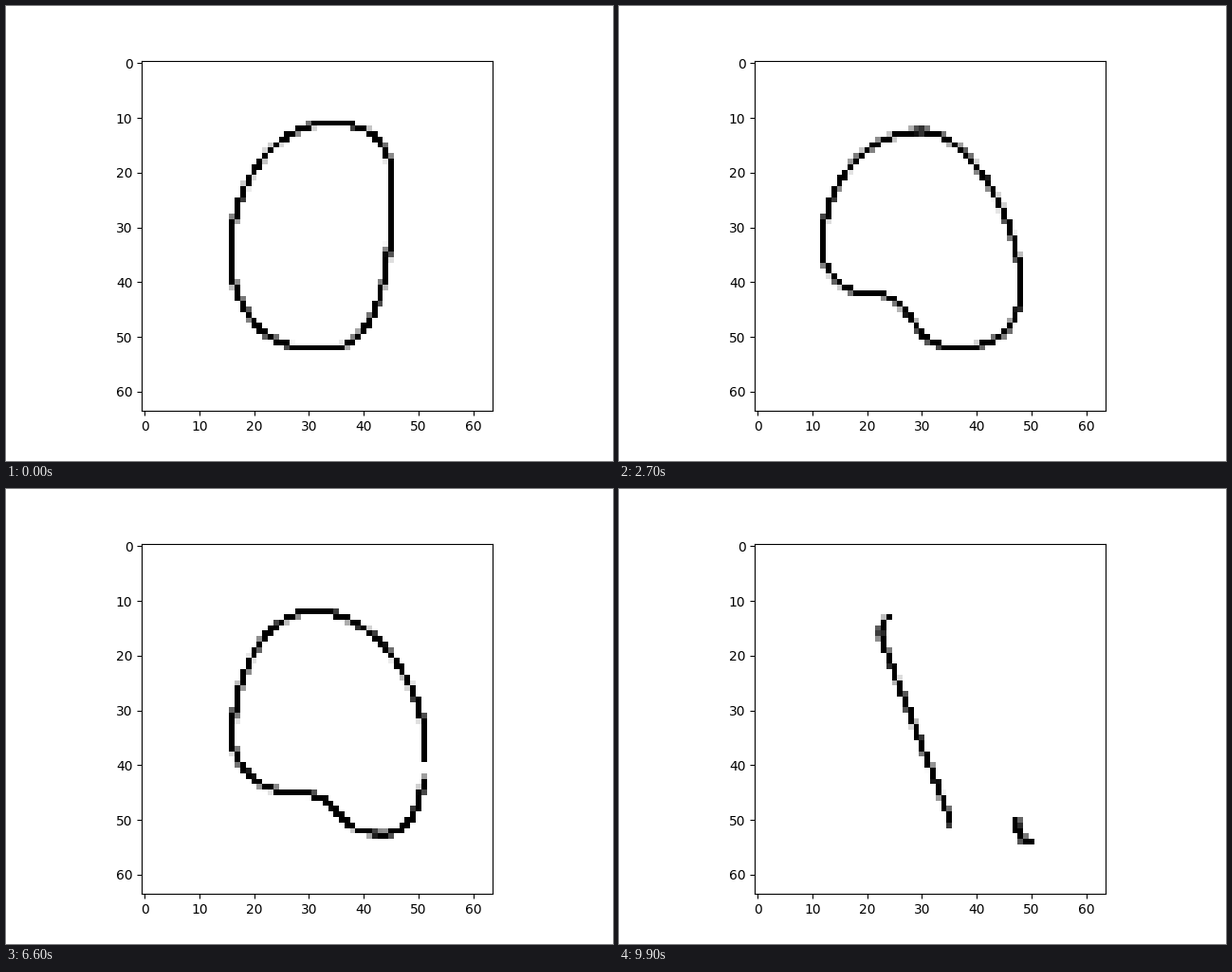
A matplotlib script for the animation above (10000 ms loop, 640 by 480 pixels).

```python
import numpy as np
import matplotlib.pyplot as plt
from matplotlib.animation import FuncAnimation

FRAMES, INTERVAL = 100, 100
SIZE = 64      # cells per side
SUB = 64       # samples per arc
HALF = 0.7     # half the line width, in cells
H, V = np.array([1, 0]), np.array([0, 1])


def pose(top, right, bottom, shelf, left):
    """The points where an outline runs level or upright."""
    return np.array([top, right, bottom, shelf, left], float)


POSES = {
    0: pose((34, 11), (45.2, 22), (34, 52), (29, 51.9), (15.8, 35)),
    11: pose((32, 11.6), (44, 38), (35, 52.2), (27, 49.8), (14, 34.5)),
    27: pose((30, 12.5), (48, 41), (36.5, 52), (20, 42), (11.9, 33.5)),
    53: pose((28.5, 11.9), (50.6, 40), (41, 52.1), (29, 50), (17, 19.5)),
    66: pose((31, 11.9), (51.2, 37), (43.7, 52.6), (27, 45), (16.2, 35)),
    84: pose((31, 11.9), (51.5, 46), (44, 55), (20, 32), (13.8, 25.5)),
    99: pose((26, 12.5), (47.3, 50), (38.2, 58), (23.2, 18.5), (22.5, 15.5)),
}
TIMES = list(POSES)
SHOULDER = [0.65, 0.8, 0.45, 0.55, 0.5, 0.7, 0.55]   # fullness, upper right


def anchors(t):
    k = min(np.searchsorted(TIMES, t, side="right"), len(TIMES) - 1)
    a, b = TIMES[k - 1], TIMES[k]
    w = (t - a) / (b - a)
    return (1 - w) * POSES[a] + w * POSES[b]


def arc(p, q, dir_p, dir_q, k):
    """Cubic from p to q, leaving along dir_p and arriving along dir_q."""
    u = (np.arange(SUB) / SUB)[:, None]
    c, d = p + k * (q - p) * dir_p, q - k * (q - p) * dir_q
    v = 1 - u
    return v**3 * p + 3 * u * v**2 * c + 3 * u**2 * v * d + u**3 * q


def outline(t):
    """Five arcs: bottom, shelf, left, top, right, foot."""
    top, right, bottom, shelf, left = anchors(t)
    drift = np.interp(t, [84, 99], [0, 1])
    foot = bottom + drift * np.array([11.8, -4])
    return np.concatenate([
        arc(bottom, shelf, H, H, 0.6 * (1 - drift)),
        arc(shelf, left, H, V, 0.55),
        arc(left, top, V, H, 0.55),
        arc(top, right, H, V, np.interp(t, TIMES, SHOULDER)),
        arc(right, foot, V, H, 0.65),
    ])


S = np.arange(5 * SUB) / SUB    # arc number plus position on the arc
yy, xx = np.mgrid[:SIZE, :SIZE]
CELLS = np.stack([xx.ravel(), yy.ravel()], 1).astype(float)


def ink(path, half=HALF):
    """How dark a stroke along path makes each cell."""
    tan = np.gradient(path, axis=0)
    tan /= np.linalg.norm(tan, axis=1, keepdims=True)
    dx = CELLS[:, :1] - path[:, 0]
    dy = CELLS[:, 1:] - path[:, 1]
    near = np.argmin(dx * dx + dy * dy, axis=1)
    dx, dy = (CELLS - path[near]).T
    tx, ty = tan[near].T
    dist = np.maximum(np.abs(dx * ty - dy * tx), np.abs(dx * tx + dy * ty))
    return np.clip((half - dist) * 4, 0, 1)


def picture(t):
    path = outline(t)
    if t < 64:
        dark = ink(path)
    else:
        # The line breaks into a shrinking stroke and a foot.
        when = [64, 66, 84, 99]
        end = np.interp(t, when, [4.13, 4.07, 3.36, 2.6])
        heel = np.interp(t, when, [4.13, 4.2, 4.42, 4])
        start, toe, half = (np.interp(t, [71, 84, 99], v) for v in (
            [0, 0.12, 0.28], [5, 4.74, 5], [HALF, 1.1, 0.85]))
        dark = np.maximum(ink(path[(S >= start) & (S <= end)]),
                          ink(path[(S >= heel) & (S <= toe)], half))
    return 1 - dark.reshape(SIZE, SIZE)


fig, ax = plt.subplots(figsize=(6.4, 4.8), dpi=100)
image = ax.imshow(picture(0), cmap="gray", vmin=0, vmax=1,
                  interpolation="nearest")


def update(i):
    image.set_data(picture(i))
    return [image]


anim = FuncAnimation(fig, update, frames=FRAMES, interval=INTERVAL, repeat=True)
plt.show()
```
